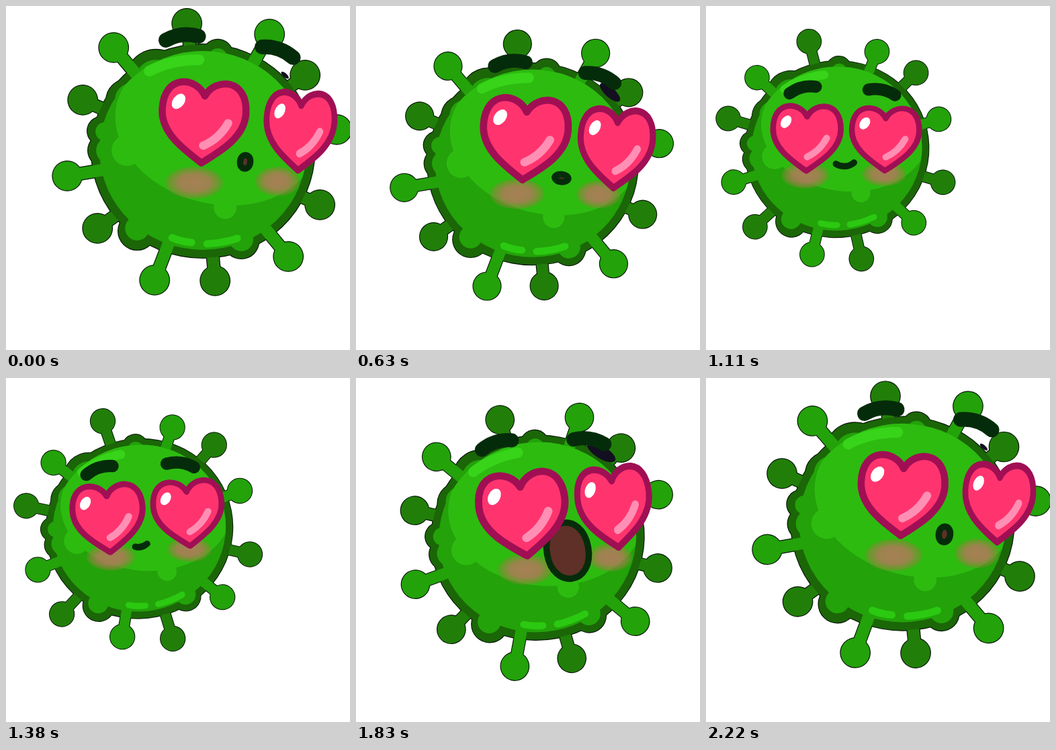
These frames come from a looping animation (512x512 px, 2.25 s). An HTML page with a canvas:

```html
<!DOCTYPE html>
<html lang="en">
<head>
<meta charset="utf-8">
<title>Lovestruck virus</title>
<style>
  html, body { margin: 0; height: 100%; overflow: hidden; background: #fff; }
  canvas { display: block; width: 100vw; height: 100vh; }
</style>
</head>
<body>
<canvas id="stage" width="512" height="512"></canvas>
<script>
const ctx = document.getElementById('stage').getContext('2d');
const LOOP = 2250, STEP = 30, RAD = Math.PI / 180;
const COLOR = {
  outline: '#081505', rim: '#1b6607', skin: '#23a20a', lit: '#2dbb10', darkSpike: '#217f09',
  shine: '#37d41a', lowShine: '#2bc911', shadow: '#130f20', ink: '#052c0a', mouth: '#5f3027',
  heart: '#ff346f', heartEdge: '#a00f54', heartShine: '#ff8fb4'
};

// Pose values at KEYS, joined by a smooth periodic curve.
const KEYS = [0, 420, 840, 1110, 1590, 1830];
const tracks = {
  x: [293.2, 289, 230.6, 195.1, 215.2, 270.8],
  y: [218.9, 225.2, 245.9, 215.5, 239.2, 240.6],
  size: [1, .985, .891, .824, .87, .955],
  turn: [0, 1.1, -2.2, -7.3, -13.7, -10.5],
  pulse: [0, 0, 0, .048, .0455, .008],
  faceTurn: [3, 4, 3, 1, -7, -6],
  heartH: [133, 142, 123, 107.5, 119, 137],
  leftX: [294, 287.5, 206, 150, 172.5, 248.5],
  leftY: [172.5, 180, 211.5, 196, 217, 202],
  rightX: [437.5, 429, 333.5, 267, 296, 384.5],
  rightY: [185.5, 195.5, 222.5, 197.5, 204, 191.5],
  rightW: [110, 120, 112, 109, 113, 116],
  browLX: [262, 260, 190, 143.5, 150, 209],
  browLY: [46, 55, 116, 123.5, 138, 98],
  browRX: [405, 400, 317, 262, 276, 347],
  browRY: [67, 79, 131, 127, 125, 93],
  blushLX: [280, 273, 198, 148, 180, 252],
  blushLY: [263, 269, 285, 252, 282, 285],
  blushRX: [404, 397, 316, 265, 298, 378],
  blushRY: [261, 269, 286, 250, 264, 267],
  mouthX: [356, 344, 259, 207, 219, 315],
  mouthY: [232, 242, 265, 236, 263, 257],
  mouthW: [7.5, 9.5, 11, 13.5, 9, 31],
  mouthH: [10, 8, 3, 0, 6.5, 42],
  mouthTurn: [8, 10, 0, -4, -20, -10],
  smile: [0, 0, .5, 2, 0, 0],
  shadow: [.2, 1, 0, 0, 0, .7]
};

const keyTime = i => KEYS[(i + 6) % 6] + Math.floor(i / 6) * LOOP;

function sample(track, t) {
  let i = 5;
  while (KEYS[i] > t) i--;
  const value = k => track[(k + 6) % 6];
  const slope = k => (value(k + 1) - value(k - 1)) / (keyTime(k + 1) - keyTime(k - 1));
  const span = keyTime(i + 1) - keyTime(i), u = (t - keyTime(i)) / span, v = 1 - u;
  return value(i) * v * v * (1 + 2 * u) + value(i + 1) * u * u * (3 - 2 * u)
    + span * u * v * (slope(i) * v - slope(i + 1) * u);
}

// Spike tips around the body; even ones lie behind it.
const SPIKES = [[-24, -193], [99, -177], [152, -116], [199, -35], [174, 77], [127, 154],
  [18, 190], [-72, 189], [-157, 112], [-202, 34], [-179, -79], [-133, -157]];
// Overlapping discs: x, y, radius and, for ovals, the second radius.
const RIM = [[0, -3, 166, 159], [-98, 116, 28], [57, 131, 26], [22, -147, 22], [-151, -33, 21],
  [-147, -4, 24], [-70, -110, 44], [-112, -78, 32]];
const SKIN = [[0, -4, 154, 148], [-98, 112, 18], [57, 128, 18], [22, -142, 14], [-146, -32, 14],
  [-139, -4, 20], [-70, -108, 31], [-107, -80, 24]];

function placed(x, y, degrees, sx, sy, draw) {
  ctx.save();
  ctx.translate(x, y);
  ctx.rotate(degrees * RAD);
  ctx.scale(sx, sy);
  draw();
  ctx.restore();
}

function oval(x, y, rx, ry, color, degrees = 0) {
  ctx.fillStyle = color;
  ctx.beginPath();
  ctx.ellipse(x, y, rx, ry, degrees * RAD, 0, 7);
  ctx.fill();
}

function discs(list, color, grow = 0) {
  list.forEach(([x, y, rx, ry = rx]) => oval(x, y, rx + grow, ry + grow, color));
}

function line(path, width, color) {
  ctx.lineWidth = width;
  ctx.strokeStyle = color;
  ctx.stroke(new Path2D(path));
}

function spikes(parity, pulse, color, grow = 0) {
  SPIKES.forEach(([x, y], i) => {
    if (i % 2 !== parity) return;
    const reach = 1 + (parity ? -pulse : pulse), base = 143 / Math.hypot(x, y);
    line(`M${x * base} ${y * base}L${x * reach} ${y * reach}`, 18 + 2 * grow, color);
    oval(x * reach, y * reach, 21.7 + grow, 21.7 + grow, color);
  });
}

function body(p) {
  spikes(0, p.pulse, COLOR.outline, 1.2);
  spikes(1, p.pulse, COLOR.outline, 1.2);
  discs(RIM, COLOR.outline, 1.2);
  spikes(0, p.pulse, COLOR.darkSpike);
  discs(RIM, COLOR.rim);
  if (p.shadow > .05) oval(122, -116, 36 * p.shadow, 14 * p.shadow, COLOR.shadow, 42);
  spikes(1, p.pulse, COLOR.skin);
  discs(SKIN, COLOR.skin);
  ctx.save();
  ctx.beginPath();
  ctx.ellipse(0, -4, 154, 148, 0, 0, 7);
  ctx.clip();
  oval(19, -37, 152, 112, COLOR.lit, 15);
  ctx.restore();
  discs([[-113, -4, 23], [33, 81, 17]], COLOR.lit);
  line('M-80-122Q-48-139-6-139', 16, COLOR.shine);
  line('M-46 126Q-32 132-17 133M6 135Q30 134 51 127', 11, COLOR.lowShine);
}

function blush(x, y, rx, ry) {
  placed(x, y, 0, rx, ry, () => {
    const glow = ctx.createRadialGradient(0, 0, 0, 0, 0, 1);
    glow.addColorStop(0, 'rgba(178,122,92,.92)');
    glow.addColorStop(.55, 'rgba(174,122,88,.85)');
    glow.addColorStop(.85, 'rgba(150,130,65,.55)');
    glow.addColorStop(1, 'rgba(120,138,50,.35)');
    oval(0, 0, 1, 1, glow);
  });
}

const HEART = 'M0-.29C-.1-.5-.46-.52-.46-.12C-.46.15-.2.32 0 .46C.2.32.46.15.46-.12C.46-.52.1-.5 0-.29Z';

function heart(x, y, w, h, turn) {
  placed(x, y, turn, w, h, () => {
    ctx.fillStyle = COLOR.heart;
    ctx.fill(new Path2D(HEART));
    line(HEART, .078, COLOR.heartEdge);
    oval(-.285, -.215, .064, .094, '#fff', 32);
    line('M.01 .265Q.18.18.27 0', .092, COLOR.heartShine);
  });
}

function brow(x, y, turn, size) {
  placed(x, y, turn, size, size, () => line('M-24.5 2Q0-8 24.5 2', 22, COLOR.ink));
}

function mouth(p) {
  const w = Math.max(p.mouthW, 0), h = Math.max(p.mouthH, 0) * 4 / 3, s = p.smile;
  const bulge = w * (.4 + .6 * Math.min(1, h / w));
  const path = `M${-w} ${-s}C${-bulge} ${2 * s - h} ${bulge} ${2 * s - h} ${w} ${-s}`
    + `C${bulge} ${2 * s + h} ${-bulge} ${2 * s + h} ${-w} ${-s}Z`;
  placed(p.mouthX, p.mouthY, p.mouthTurn, 1, 1, () => {
    ctx.fillStyle = COLOR.mouth;
    ctx.fill(new Path2D(path));
    line(path, 9.5, COLOR.ink);
  });
}

function draw(t) {
  const p = {};
  for (const name in tracks) p[name] = sample(tracks[name], t);
  ctx.clearRect(0, 0, 512, 512);
  ctx.lineCap = ctx.lineJoin = 'round';
  placed(p.x, p.y, p.turn, p.size, p.size, () => body(p));

  ctx.save();
  ctx.beginPath();
  ctx.arc(p.x, p.y - 4 * p.size, 154 * p.size, 0, 7);
  ctx.clip();
  blush(p.blushLX, p.blushLY, 43 * p.size, 24 * p.size);
  blush(p.blushRX, p.blushRY, 33, 22 * p.size);
  ctx.restore();

  mouth(p);
  brow(p.browLX, p.browLY, p.turn - 7, p.size);
  brow(p.browRX, p.browRY, p.turn + 19, p.size);
  heart(p.leftX, p.leftY, p.heartH * 1.02, p.heartH, p.faceTurn);
  heart(p.rightX, p.rightY, p.rightW, p.heartH * .965, p.faceTurn);
}

const start = performance.now();
function tick() {
  const t = (performance.now() - start) % LOOP;
  draw(Math.floor(t / STEP) * STEP);
  requestAnimationFrame(tick);
}
tick();
</script>
</body>
</html>
```
